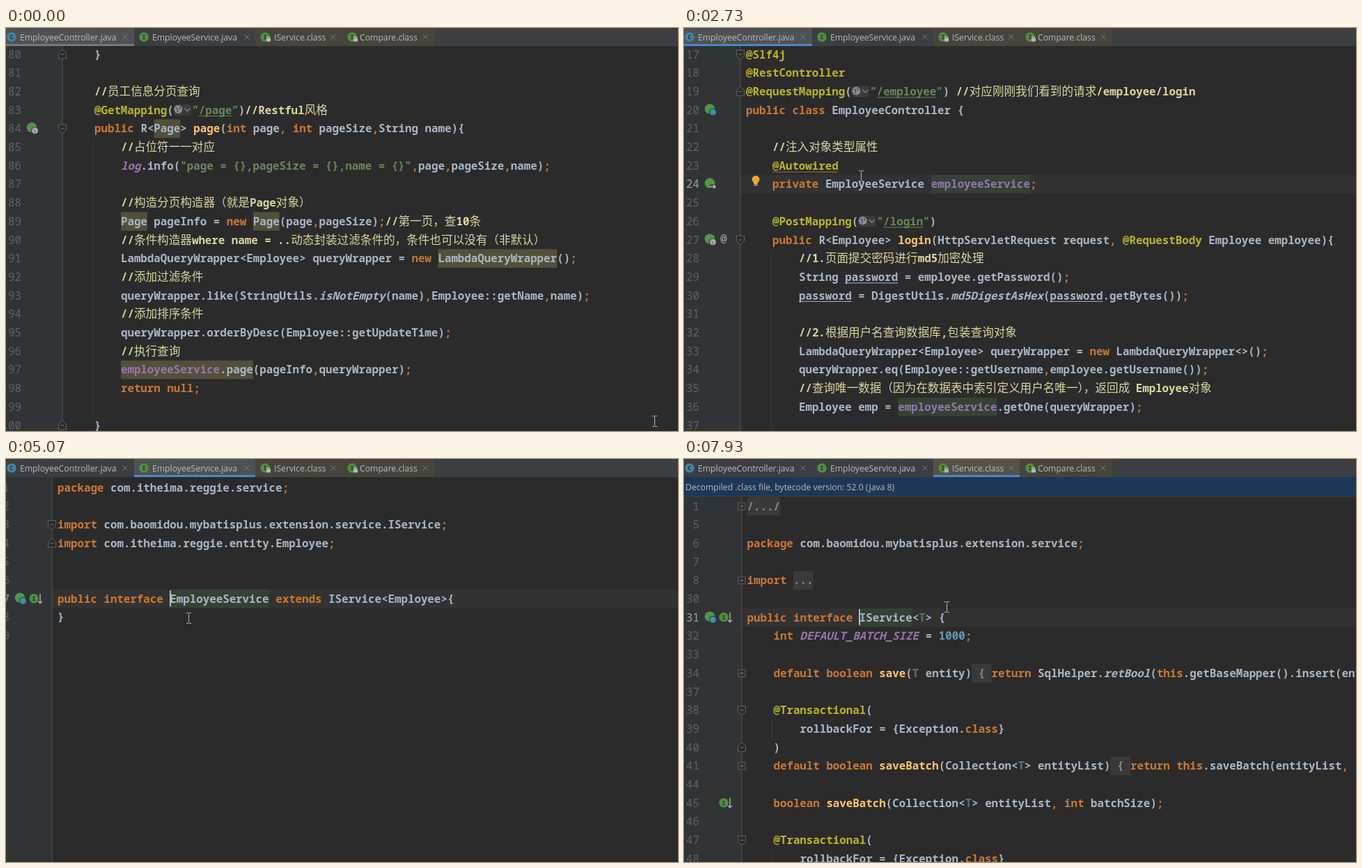
An HTML page with a canvas that plays this animation: 965 px wide and 580 px high, repeating every 8000 ms.

```html
<!DOCTYPE html>
<html lang="zh">
<head>
<meta charset="utf-8">
<title>Code editor</title>
<style>
  html, body { margin: 0; width: 100%; height: 100%; overflow: hidden; background: #2b2b2b; }
  canvas { display: block; }
</style>
</head>
<body>
<canvas id="stage" width="965" height="580"></canvas>
<script>
const ctx = document.getElementById('stage').getContext('2d');
const LOOP = 8000, STEP = 1000 / 15;
const CHAR = 9.49, HAN = 16.6, ROW = 26.7;
const MONO = '15.8px "Noto Sans Mono", monospace';
const UI = '12.2px "Open Sans", sans-serif';
const COLOR = {
  plain: '#a9b7c6', keyword: '#cc7832', note: '#bbb529', string: '#6a8759', method: '#ffc66d',
  field: '#9876aa', number: '#6897bb', type: '#507874', comment: '#dad7a0', fold: '#8c8c8c'
};
const KEYWORDS = new Set(('public private class interface extends package import int new ' +
  'return null default boolean this').split(' '));

// Markup: [warning] ^folded^ #method $static ~staticField &underlined, % = URL inlay
const listing = text => text.split('\n').slice(1, -1);
const range = (first, n) => Array.from({ length: n }, (_, i) => first + i);

const pages = [{
  tab: 0, x: 89, y: 38, edge: 81, nums: range(80, 21), guides: [[4.5, 19.5]],
  folds: [[0, '^'], [4, 'v'], [20, '^']],
  beans: [[4, 'globe']],
  code: listing(`
    }

    //员工信息分页查询
    @GetMapping(%"/page")//Restful风格
    public R<[Page]> #page(int page, int pageSize,String name){
        //占位符一一对应
        ~log.info("page = {},pageSize = {},name = {}",page,pageSize,name);

        //构造分页构造器（就是Page对象）
        [Page] pageInfo = new [Page](page,pageSize);//第一页，查10条
        //条件构造器where name = ..动态封装过滤条件的，条件也可以没有（非默认）
        LambdaQueryWrapper<Employee> queryWrapper = new [LambdaQueryWrapper]();
        //添加过滤条件
        queryWrapper.like(StringUtils.$isNotEmpty(name),Employee::getName,name);
        //添加排序条件
        queryWrapper.orderByDesc(Employee::getUpdateTime);
        //执行查询
        [employeeService.page](pageInfo,queryWrapper);
        return null;

    }
`)
}, {
  tab: 0, x: 89, y: 38, edge: 81, nums: range(17, 21), current: 7, guides: [[10.5, 20.5]], bulb: [103, 220],
  folds: [[0, 'v'], [2, '^'], [10, 'v']],
  beans: [[3, 'class'], [7, 'arrow'], [10, 'globe']], at: 10,
  code: listing(`
@Slf4j
@RestController
@RequestMapping(%"/employee") //对应刚刚我们看到的请求/employee/login
public class EmployeeController {

    //注入对象类型属性
    @Autowired
    private EmployeeService employeeService;

    @PostMapping(%"/login")
    public R<Employee> #login(HttpServletRequest request, @RequestBody Employee employee){
        //1.页面提交密码进行md5加密处理
        String &password = employee.getPassword();
        &password = DigestUtils.$md5DigestAsHex(&password.getBytes());

        //2.根据用户名查询数据库,包装查询对象
        LambdaQueryWrapper<Employee> queryWrapper = new LambdaQueryWrapper<>();
        queryWrapper.eq(Employee::getUsername,employee.getUsername());
        //查询唯一数据（因为在数据表中索引定义用户名唯一），返回成Employee对象
        Employee emp = employeeService.getOne(queryWrapper);
`)
}, {
  tab: 1, x: 74, y: 41, edge: 66, shift: -17, nums: range(1, 9), current: 6, bulb: [88, 179],
  folds: [[2, 'v'], [3, '^']],
  beans: [[6, 'class']], impls: [6],
  code: listing(`
package com.itheima.reggie.service;

import com.baomidou.mybatisplus.extension.service.IService;
import com.itheima.reggie.entity.Employee;


public interface EmployeeService extends IService<Employee>{
}
`)
}, {
  tab: 2, x: 90.5, y: 68, edge: 83, current: 6, guides: [[11.5, 12.5], [18.5, 19.5]],
  nums: [1, ...range(5, 4), ...range(30, 5), ...range(37, 5), ...range(44, 5)],
  folds: [[0, '+'], [4, '+'], [9, '+'], [11, 'v'], [13, '^'], [14, '+'], [18, 'v']],
  beans: [[6, 'class']], impls: [6, 16],
  code: listing(`
^/.../^

package com.baomidou.mybatisplus.extension.service;

import ^...^

public interface IService<T> {
    int ~DEFAULT_BATCH_SIZE = 1000;

    default boolean #save(T entity)^ { ^return SqlHelper.$retBool(this.getBaseMapper().insert(entity));

    @Transactional(
        rollbackFor = {Exception.class}
    )
    default boolean #saveBatch(Collection<T> entityList)^ { ^return this.saveBatch(entityList, 1000);

    boolean #saveBatch(Collection<T> entityList, int batchSize);

    @Transactional(
        rollbackFor = {Exception.class}
`)
}];

const views = [
  { from: 0, page: 0 },
  { from: 21, page: 1, word: 'employeeService', caret: 28, bulb: 36 },
  { from: 68, page: 1, word: 'EmployeeService', caret: 18 },
  { from: 70, page: 2, word: 'EmployeeService', caret: 17, bulb: 85 },
  { from: 107, page: 2, word: 'IService', caret: 45 },
  { from: 109, page: 3, word: 'IService', caret: 17 }
];

// Pointer path: step, x, y
const path = [
  [0, 931, 566], [13, 272, 502], [14, 269, 495], [27, 269, 495], [40, 255, 214], [41, 254, 213],
  [46, 199, 227], [49, 199, 227], [62, 258, 229], [63, 259, 229], [75, 259, 229], [88, 459, 206],
  [91, 481, 207], [95, 501, 207], [115, 501, 207], [119, 377, 213]
];

const tabs = [
  { x: 0, end: 184, icon: 8, label: 20, close: 171, name: 'EmployeeController.java', letter: 'C' },
  { x: 184, end: 358, icon: 198, label: 210, close: 346, name: 'EmployeeService.java', letter: 'I' },
  { x: 358, end: 482, icon: 372, label: 385, close: 470, name: 'IService.class', letter: 'I', library: true },
  { x: 482, end: 615, icon: 497, label: 508, close: 602, name: 'Compare.class', letter: 'I', library: true }
];

function rect(x, y, w, h, color) {
  ctx.fillStyle = color;
  ctx.fillRect(x, y, w, h);
}

function disc(x, y, r, color) {
  ctx.fillStyle = color;
  ctx.beginPath();
  ctx.arc(x, y, r, 0, Math.PI * 2);
  ctx.fill();
}

function stroke(color, width, ...lines) {
  ctx.strokeStyle = color;
  ctx.lineWidth = width;
  ctx.beginPath();
  for (const [x, y, ...rest] of lines) {
    ctx.moveTo(x, y);
    for (let i = 0; i < rest.length; i += 2) ctx.lineTo(rest[i], rest[i + 1]);
  }
  ctx.stroke();
}

function write(text, x, y, color, font, align = 'left') {
  ctx.font = font;
  ctx.fillStyle = color;
  ctx.textAlign = align;
  ctx.fillText(text, x, y);
}

function letterIcon(x, y, letter) {
  disc(x, y, 6.7, letter === 'C' ? '#3e86a0' : '#4f8f3c');
  write(letter, x, y + 3.3, '#233038', 'bold 9px "Noto Sans Mono", monospace', 'center');
}

function bean(x, y, badge) {
  disc(x - 1, y - 1, 7.3, '#4f9746');
  if (badge === 'arrow') {
    rect(x - 1, y + 1, 9, 6, '#313335');
    stroke('#b4b8bb', 1.6, [x - 1, y + 4, x + 7, y + 4], [x + 4.5, y + 1.5, x + 7, y + 4, x + 4.5, y + 6.5]);
    return;
  }
  disc(x + 3.5, y + 3.5, 5.5, '#313335');
  disc(x + 3.5, y + 3.5, 4.5, badge === 'class' ? '#3f8fb0' : '#a5abae');
  if (badge === 'globe') stroke('#5c6164', 1, [x + 1, y + 2, x + 4, y + 4, x + 3, y + 7]);
}

function implementation(x, y) {
  letterIcon(x - 1, y, 'I');
  stroke('#a5abae', 1.5, [x + 8, y - 7, x + 8, y + 7], [x + 5, y + 4, x + 8, y + 7, x + 11, y + 4]);
}

function foldMark(x, y, kind) {
  const tip = kind === 'v' ? 1 : -1;
  ctx.fillStyle = '#2b2b2b';
  ctx.strokeStyle = '#606366';
  ctx.lineWidth = 1;
  ctx.beginPath();
  if (kind === '+') ctx.rect(x - 5, y - 5, 10, 10);
  else {
    ctx.moveTo(x - 5.5, y - 6 * tip);
    ctx.lineTo(x + 5.5, y - 6 * tip);
    ctx.lineTo(x + 5.5, y + 2 * tip);
    ctx.lineTo(x, y + 7 * tip);
    ctx.lineTo(x - 5.5, y + 2 * tip);
    ctx.closePath();
  }
  ctx.fill();
  ctx.stroke();
  stroke('#75787a', 1, [x - 2.5, y, x + 2.5, y]);
  if (kind === '+') stroke('#75787a', 1, [x, y - 2.5, x, y + 2.5]);
}

function inlay(x, y) {
  ctx.fillStyle = '#393b3c';
  ctx.beginPath();
  ctx.roundRect(x, y - 8, 25, 16, 4);
  ctx.fill();
  disc(x + 6.5, y - 1, 6, '#8a8d8f');
  stroke('#45484a', 1.3, [x + 3, y - 4, x + 6, y - 1, x + 5, y + 3], [x + 8, y - 5, x + 10, y - 1]);
  stroke('#8a8d8f', 1.3, [x + 15.5, y - 2.5, x + 19.5, y + 1.5, x + 23.5, y - 2.5]);
}

function bulb(x, y) {
  disc(x, y - 2, 5.4, '#f0a732');
  rect(x - 2.5, y + 2, 5, 3, '#f0a732');
  rect(x - 2.5, y + 5.5, 5, 1.5, '#b0b0b0');
}

// Draws mixed Latin and Han text, returns the x after it
function run(text, x, y, color, style = '') {
  for (const part of text.match(/[\x00-\x7f]+|[^\x00-\x7f]+/g) || []) {
    const han = part.charCodeAt(0) > 127;
    write(part, x, y + 5.5, color,
      han ? `500 ${HAN}px "Noto Sans CJK SC", "Noto Sans CJK", sans-serif` : `${style} 600 ${MONO}`);
    x += part.length * (han ? HAN : CHAR);
  }
  return x;
}

function wordStyle(word) {
  if (KEYWORDS.has(word) || word === ';' || word === ',') return COLOR.keyword;
  if (word === 'employeeService') return COLOR.field;
  if (word === 'T') return COLOR.type;
  return /^\d+$/.test(word) ? COLOR.number : COLOR.plain;
}

function codeLine(line, x, y, marked) {
  const box = (n, color) => rect(x, y - ROW / 2, n * CHAR, ROW, color);
  const underline = (from, to, color) => stroke(color, 1, [from, y + 8.5, to, y + 8.5]);
  for (const { 0: token, index } of line.matchAll(/\/\/.*|\^[^^]*\^|"[^"]*"|@\w+|[#$~&]?\w+|\W/g)) {
    const mark = token[0], rest = token.slice(1), start = x;
    if (mark === '[') box(line.indexOf(']', index) - index - 1, '#52503a');
    else if (mark === ']') continue;
    else if (mark === '%') { inlay(x, y); x += 26.5; }
    else if (mark === '/' && token.length > 1) x = run(token, x, y, COLOR.comment);
    else if (mark === '^') {
      box(token.length - 2, '#3a3a3a');
      x = run(rest.slice(0, -1), x, y, COLOR.fold);
    } else if (mark === '"') {
      x = run(token, x, y, COLOR.string);
      if (rest[0] === '/') underline(start + CHAR, x - CHAR, COLOR.string);
    } else if (mark === '@') {
      x = run(token, x, y, COLOR.note);
      if (token === '@Autowired') {
        const wave = [];
        for (let i = 0; start + i * 2 < x; i++) wave.push(start + i * 2, y + 8 + i % 2 * 2);
        stroke('#8f8b4a', 1, wave);
      }
    } else if (mark === '#') x = run(rest, x, y, COLOR.method);
    else if (mark === '$') x = run(rest, x, y, COLOR.plain, 'italic');
    else if (mark === '~') x = run(rest, x, y, COLOR.field, 'italic');
    else if (mark === '&') {
      x = run(rest, x, y, COLOR.plain);
      underline(start, x, COLOR.plain);
    } else {
      if (token === marked) box(token.length, '#344134');
      x = run(token, x, y, wordStyle(token));
    }
  }
}

function tabBar(active, focused) {
  rect(0, 0, 965, 26, '#3c3f41');
  tabs.forEach((tab, i) => {
    const on = i === active, width = tab.end - tab.x;
    if (tab.library) rect(tab.x, 0, width, 26, on ? '#545247' : '#45443d');
    else if (on) rect(tab.x, 0, width, 26, '#4e5254');
    if (on) rect(tab.x, 23, width, 3, focused ? '#4a88c7' : '#747a80');
    letterIcon(tab.icon, 13, tab.letter);
    if (tab.library) {
      rect(tab.icon + 2, 14.5, 6, 5, '#b4b8bb');
      ctx.strokeStyle = '#b4b8bb';
      ctx.strokeRect(tab.icon + 3.5, 12.5, 3, 3);
    }
    write(tab.name, tab.label, 17.5, '#bbbbbb', UI);
    const c = tab.close;
    stroke('#77797a', 1, [c - 3.5, 9.5, c + 3.5, 16.5], [c + 3.5, 9.5, c - 3.5, 16.5]);
  });
}

function editor(page, view, step) {
  const { x, edge, shift = 0, current } = page;
  const rowY = i => page.y + i * ROW;
  rect(0, 26, 965, 554, '#2b2b2b');
  rect(0, 26, edge, 554, '#313335');
  if (current) rect(edge, rowY(current) - ROW / 2, 965 - edge, ROW, '#323232');
  rect(edge - 0.5, 26, 1, 554, '#555555');
  for (const [a, b] of page.guides || []) rect(Math.round(x + 4 * CHAR - 2), rowY(a), 1, (b - a) * ROW, '#393939');

  page.nums.forEach((n, i) =>
    write(n, 22 + shift, rowY(i) + 5.5, i === current ? '#a4a3a3' : '#606366', MONO, 'right'));
  page.folds.forEach(([i, kind]) => foldMark(edge, rowY(i), kind));
  page.beans.forEach(([i, badge]) => bean(38 + shift, rowY(i) - 0.5, badge));
  (page.impls || []).forEach(i => implementation(58 + shift, rowY(i) - 0.5));
  if (page.at) write('@', 57, rowY(page.at) + 4, '#afb1b3', MONO, 'center');
  page.code.forEach((line, i) => codeLine(line, x, rowY(i), view.word));

  const blink = Math.floor((step - view.from - 14.6) / 7.3);
  if (view.caret && (blink < 0 || blink % 2)) {
    rect(Math.round(x + view.caret * CHAR - 0.8), rowY(current) - 12, 2, 23, '#bbbbbb');
  }
  if (step >= view.bulb) bulb(...page.bulb);
  if (page.tab === 2) {
    rect(0, 26, 965, 28, '#1d3857');
    rect(0, 53, 965, 1, '#404346');
    write('Decompiled .class file, bytecode version: 52.0 (Java 8)', 2, 44.5, '#bbbbbb', UI);
  }
}

function pointer(step) {
  const i = Math.max(1, path.findIndex(p => p[0] >= step));
  const [k0, x0, y0] = path[i - 1], [k1, x1, y1] = path[i];
  const p = (step - k0) / (k1 - k0), e = p * p * (3 - 2 * p);
  const x = Math.round(x0 + (x1 - x0) * e) + 0.5, y = Math.round(y0 + (y1 - y0) * e);
  stroke('#c0c0c0', 1, [x, y - 6.5, x, y + 6.5],
    ...[-7.5, 7.5].flatMap(d => [[x - 3.5, y + d, x - 0.5, y + d], [x + 0.5, y + d, x + 3.5, y + d]]));
}

let shown = -1;
function frame(now) {
  const step = Math.min(119, Math.floor((now % LOOP) / STEP + 0.06));
  if (step !== shown) {
    shown = step;
    const view = views.findLast(v => v.from <= step), page = pages[view.page];
    editor(page, view, step);
    tabBar(page.tab, view.page > 0);
    pointer(step);
  }
  requestAnimationFrame(frame);
}
requestAnimationFrame(frame);
</script>
</body>
</html>
```
